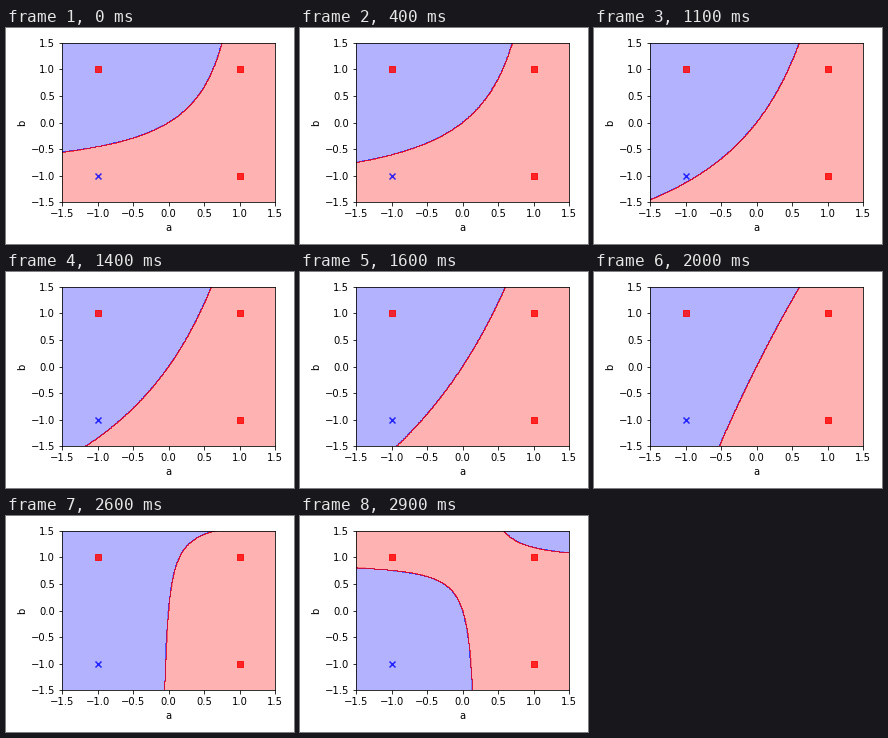
Animation of 288 by 216 pixels, one loop 3 s. Source, as a matplotlib script:

```python
import numpy as np
import matplotlib.pyplot as plt
from matplotlib.animation import FuncAnimation
from matplotlib.colors import ListedColormap

WIDTH, HEIGHT, DPI = 288, 216, 72
FRAMES, INTERVAL = 30, 100
LIMIT = 1.5

# Perceptron weights for the features a, b and a*b, in learning-rate units
START = np.array([29.08, -35.8, 28.13])
POINTS = [(1, 1, 1), (-1, 1, 1), (1, -1, 1), (-1, -1, -1)]

plt.rcParams["font.family"] = "DejaVu Sans"
plt.rcParams["font.size"] = 10


def features(a, b):
    return np.array([a, b, a * b])


def train(steps):
    """Batch perceptron: every misclassified point pushes the weights."""
    w = START.copy()
    for _ in range(steps):
        w = w + sum(
            (y * features(a, b) for a, b, y in POINTS if y * (w @ features(a, b)) <= 0),
            np.zeros(3),
        )
    return w


fig = plt.figure(figsize=(WIDTH / DPI, HEIGHT / DPI), dpi=DPI)
left, right, top, bottom = 56.1, 269.1, 14.6, 174.4
ax = fig.add_axes([
    left / WIDTH, 1 - bottom / HEIGHT,
    (right - left) / WIDTH, (bottom - top) / HEIGHT,
])

axis = np.linspace(-LIMIT, LIMIT, 301)
grid_a, grid_b = np.meshgrid(axis, axis)
cmap = ListedColormap(["blue", "red"])
regions = []

for label, marker, color in [(1, "s", "red"), (-1, "x", "blue")]:
    xs, ys = zip(*[(a, b) for a, b, y in POINTS if y == label])
    ax.scatter(xs, ys, c=color, marker=marker, alpha=0.8, zorder=1.5)

ticks = np.arange(-LIMIT, LIMIT + 0.1, 0.5)
ax.set(xlim=(-LIMIT, LIMIT), ylim=(-LIMIT, LIMIT),
       xticks=ticks, yticks=ticks, xlabel="a", ylabel="b")


def update(frame):
    while regions:
        regions.pop().remove()
    score = np.tensordot(train(frame), features(grid_a, grid_b), axes=1)
    side = np.where(score > 0, 1, -1)
    regions.append(ax.contourf(grid_a, grid_b, side, alpha=0.3, cmap=cmap))
    return []


anim = FuncAnimation(fig, update, frames=FRAMES, interval=INTERVAL,
                     init_func=lambda: update(0), repeat=True, repeat_delay=0)
plt.show()
```
